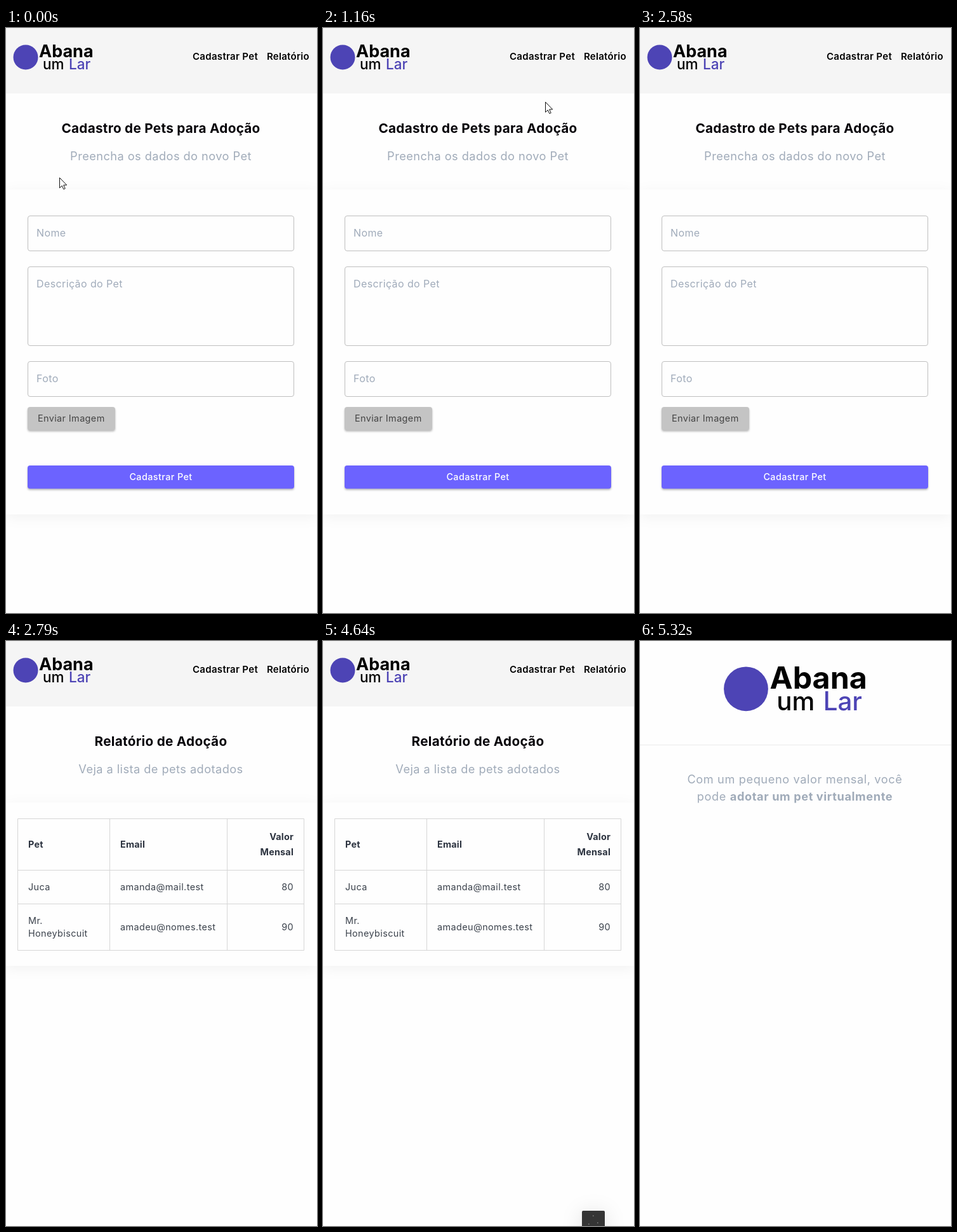
Recreate the animation shown at these times as an HTML page. Size 490x920 px, loop 5.39 s.

```html
<!DOCTYPE html>
<html lang="pt-BR">
<head>
<meta charset="utf-8">
<title>Cadastro de pets</title>
<style>
  html, body { margin: 0; width: 100%; height: 100%; overflow: hidden; background: #fefefe; }
  svg { display: block; width: 490px; height: 920px; }
  text { font: 400 14.4px Inter, "Open Sans", sans-serif; letter-spacing: .4px; white-space: pre; }
  .mid { text-anchor: middle; }
  .end { text-anchor: end; }
  .brand { font-size: 27px; font-weight: 700; letter-spacing: 0; }
  .brand2 { font-size: 22.5px; font-weight: 500; letter-spacing: 0; }
  .accent { fill: #4d44b5; }
  .nav { font-size: 15px; font-weight: 600; letter-spacing: .3px; }
  .title { font-size: 20.7px; font-weight: 700; letter-spacing: .3px; fill: #060409; }
  .sub { font-size: 18.2px; letter-spacing: .45px; fill: #a0abb9; }
  .home { letter-spacing: .6px; }
  .hint { font-size: 16px; fill: #a0abba; }
  .head { font-weight: 700; letter-spacing: .2px; fill: #2d3440; }
  .cell { fill: #3b424c; }
  .card { fill: #fefefe; filter: drop-shadow(0 4px 10px rgba(0, 0, 0, .05)); }
  .field { fill: none; stroke: #bfbfbf; }
  .grid { fill: none; stroke: #d6d6d6; }
  .button { filter: drop-shadow(0 2px 1.5px rgba(0, 0, 0, .28)); }
  .popup { filter: drop-shadow(0 4px 16px rgba(0, 0, 0, .12)); }
</style>
</head>
<body>
<svg viewBox="0 0 490 920">
  <defs>
    <g id="logo">
      <circle class="accent" cx="31" cy="46" r="19.5"/>
      <text class="brand" x="52" y="46">Abana</text>
      <text class="brand2" x="58" y="65">um</text>
      <text class="brand2 accent" x="99" y="65">Lar</text>
    </g>
  </defs>
  <rect width="490" height="920" fill="#fefefe"/>

  <g id="header">
    <rect width="490" height="103" fill="#f5f5f5"/>
    <use href="#logo"/>
    <text class="nav mid" x="345.5" y="50">Cadastrar Pet</text>
    <text class="nav end" x="478" y="50">Relatório</text>
  </g>

  <g id="form">
    <text class="title mid" x="244" y="165">Cadastro de Pets para Adoção</text>
    <text class="sub mid" x="244" y="208">Preencha os dados do novo Pet</text>
    <rect class="card" y="254" width="490" height="511"/>
    <rect class="field" x="34.5" y="295.5" width="419" height="55" rx="3.5"/>
    <rect class="field" x="34.5" y="375.5" width="419" height="124" rx="3.5"/>
    <rect class="field" x="34.5" y="524.5" width="419" height="55" rx="3.5"/>
    <text class="hint" x="48" y="328">Nome</text>
    <text class="hint" x="48" y="408">Descrição do Pet</text>
    <text class="hint" x="48" y="557">Foto</text>
    <rect class="button" x="34" y="596" width="138" height="36.5" rx="4" fill="#c4c4c4"/>
    <text x="50" y="619" fill="#444">Enviar Imagem</text>
    <rect class="button" x="34" y="688" width="420" height="36.5" rx="4" fill="#6c63ff"/>
    <text class="mid" x="244" y="711" fill="#fff" style="font-weight: 500">Cadastrar Pet</text>
  </g>

  <g id="report">
    <text class="title mid" x="244" y="165">Relatório de Adoção</text>
    <text class="sub mid" x="244" y="208">Veja a lista de pets adotados</text>
    <rect class="card" y="254" width="490" height="257"/>
    <path class="grid" d="M18.5 279.5H469.5V486.5H18.5ZM18.5 360.5H469.5M18.5 413.5H469.5M163.5 279.5V486.5M348.5 279.5V486.5"/>
    <text class="head" x="35" y="325">Pet</text>
    <text class="head" x="180" y="325">Email</text>
    <text class="head end" x="453" y="313">Valor</text>
    <text class="head end" x="453" y="337">Mensal</text>
    <text class="cell" x="35" y="392">Juca</text>
    <text class="cell" x="180" y="392">amanda@mail.test</text>
    <text class="cell end" x="453" y="392">80</text>
    <text class="cell" x="35" y="445">Mr.</text>
    <text class="cell" x="35" y="465">Honeybiscuit</text>
    <text class="cell" x="180" y="455">amadeu@nomes.test</text>
    <text class="cell end" x="453" y="455">90</text>
  </g>

  <g id="popup">
    <rect class="popup" x="408" y="896" width="36" height="40" rx="2" fill="#353535"/>
    <path d="M425 904h1.5M418 917h1.5M432 915h1.5" stroke="#aaa"/>
  </g>

  <g id="home">
    <use href="#logo" transform="translate(111.5 -7) scale(1.79)"/>
    <path d="M0 163.5H490" stroke="#ebebeb"/>
    <text class="sub home mid" x="244" y="224">Com um pequeno valor mensal, você</text>
    <text class="sub home mid" x="244" y="251">pode <tspan font-weight="700">adotar um pet virtualmente</tspan></text>
  </g>

  <path id="cursor" d="M.5 .5V16.5L4.2 13L6.8 18.6L9.2 17.5L6.7 12H11.7Z" fill="#fff" stroke="#111"/>
</svg>
<script>
  const LOOP = 5390;
  const REPORT = 2790, HOME = 5320;

  // rows: [time in ms, property values, easing until the next row]
  function play(id, rows) {
    const frames = rows.map(([ms, props, easing = 'step-end']) =>
      ({ ...props, easing, offset: ms / LOOP }));
    document.getElementById(id).animate(frames, { duration: LOOP, iterations: Infinity });
  }

  function show(id, from, to) {
    play(id, [
      [0, { opacity: from ? 0 : 1 }],
      [from, { opacity: 1 }],
      [to, { opacity: 0 }],
      [LOOP, { opacity: 0 }]
    ]);
  }

  const at = (x, y) => ({ transform: `translate(${x}px, ${y}px)` });

  show('header', 0, HOME);
  show('form', 0, REPORT);
  show('report', REPORT, HOME);
  show('home', HOME, LOOP);

  play('popup', [
    [0, { opacity: 0 }],
    [4640, { opacity: 1 }],
    [4770, { opacity: .5 }],
    [4840, { opacity: 0 }],
    [LOOP, { opacity: 0 }]
  ]);

  play('cursor', [
    [0, at(84, 235), 'steps(17)'],
    [1160, at(350, 116), 'steps(7)'],
    [1640, at(405, 14), 'steps(3)'],
    [1850, at(425, -24)],
    [LOOP, at(425, -24)]
  ]);
</script>
</body>
</html>
```
